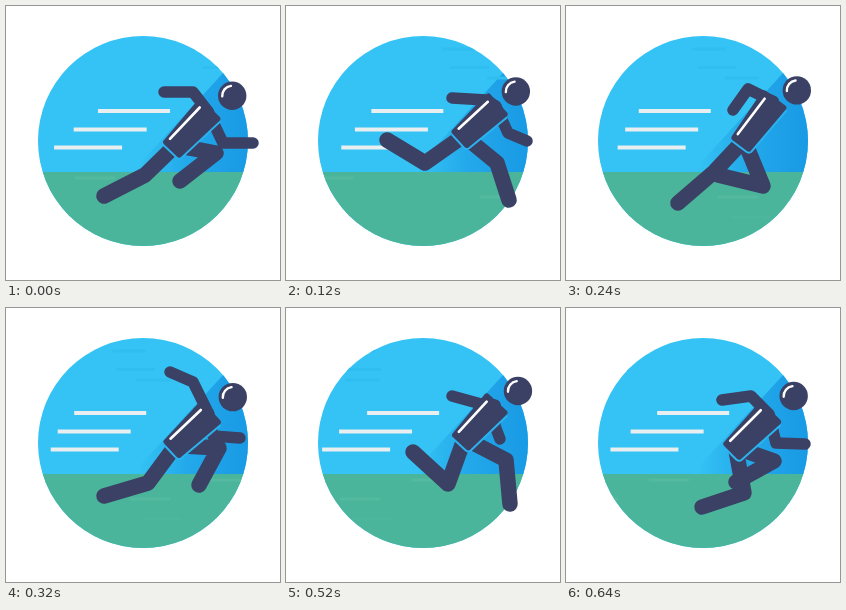
These frames come from a looping animation (274 by 274 pixels, 0.68 s). An HTML page with a canvas:

```html
<!DOCTYPE html>
<html lang="en">
<head>
<meta charset="utf-8">
<title>Runner</title>
<style>
html, body { margin: 0; width: 100%; height: 100%; overflow: hidden; background: #fff; }
canvas { display: block; width: 100vw; height: 100vh; }
</style>
</head>
<body>
<canvas id="stage"></canvas>
<script>
const SIZE = 274, LOOP = 680, STEP = 40, TAU = Math.PI * 2;
const SKY = '#34c3f4', GRASS = '#4ab59a', BODY = '#3b4165', GAP = '#2bb3f0', LINE = '#e9eef0';
const canvas = document.getElementById('stage');
const ctx = canvas.getContext('2d');

// Key poses of one stride: x, y of each joint at the times in KEYS.
const KEYS = [0, 120, 240, 320, 440, 520, 640];
const JOINTS = {
  hip:      [166,143, 174,133, 175,138, 166,141, 173,133, 175,134, 166,143],
  chest:    [204,103, 212,98,  209,93,  205,104, 213,99,  211,95,  205,104],
  kneeA:    [139,169, 139,157, 197,180, 213,140, 218,143, 220,152, 178,185],
  footA:    [98,190,  101,134, 152,169, 193,177, 241,180, 224,196, 136,199],
  kneeB:    [210,147, 211,157, 148,166, 142,175, 138,158, 162,176, 208,153],
  footB:    [174,175, 223,194, 112,197, 98,188,  101,135, 127,144, 170,174],
  elbowA:   [187,86,  200,94,  201,112, 207,128, 222,121, 209,118, 185,88],
  handA:    [158,86,  166,92,  200,118, 234,130, 242,130, 214,131, 156,92],
  elbowB:   [217,137, 222,127, 182,83,  187,74,  198,84,  195,96,  210,135],
  handB:    [247,137, 241,135, 167,104, 164,64,  173,64,  166,88,  239,136]
};
// Rear speed lines: y, middle x, swing, phase in degrees, length.
const LINES = [[105, 80, 12, 0, 72], [123.5, 59, 11, 38, 73], [141.5, 45.5, 10, 75, 68]];
// Faint streaks: y, start x, speed in px per ms, length, colour.
const STREAKS = [
  [43, 188, .25, 30, '#30bdef'], [61.5, 198, .27, 36, '#30bdef'], [72, 245, .355, 32, '#30bdef'],
  [172, 70, .35, 38, '#53baa0'], [191, 237, .35, 38, '#53baa0'], [211, 250, .35, 36, '#4db79d']
];

// Periodic cubic through uneven keys.
function sample(track, axis, t) {
  const n = KEYS.length;
  const time = i => KEYS[(i + n) % n] + Math.floor(i / n) * LOOP;
  const value = i => track[((i + n) % n) * 2 + axis];
  const slope = i => (value(i + 1) - value(i - 1)) / (time(i + 1) - time(i - 1));
  let i = n - 1;
  while (KEYS[i] > t) i--;
  const d = time(i + 1) - time(i), u = (t - time(i)) / d, v = 1 - u;
  return value(i) * v * v * (1 + 2 * u) + value(i + 1) * u * u * (3 - 2 * u)
    + d * u * v * (slope(i) * v - slope(i + 1) * u);
}

function stroke(points, width, color, cap = 'round') {
  ctx.beginPath();
  points.forEach(p => ctx.lineTo(p[0], p[1]));
  ctx.lineWidth = width;
  ctx.strokeStyle = color;
  ctx.lineCap = cap;
  ctx.lineJoin = 'round';
  ctx.stroke();
}

function backdrop(t) {
  ctx.save();
  ctx.beginPath();
  ctx.arc(137, 135, 105, 0, TAU);
  ctx.clip();
  ctx.fillStyle = SKY;
  ctx.fillRect(0, 0, SIZE, SIZE);
  const shade = ctx.createLinearGradient(132, 0, 240, 0);
  shade.addColorStop(0, 'rgba(24,152,228,0)');
  shade.addColorStop(.45, 'rgba(24,152,228,.6)');
  shade.addColorStop(1, 'rgba(24,152,228,.95)');
  ctx.fillStyle = shade;
  ctx.beginPath();
  [[218, 66], [126, 166], [250, 166], [250, 66]].forEach(p => ctx.lineTo(p[0], p[1]));
  ctx.fill();
  ctx.fillStyle = GRASS;
  ctx.fillRect(0, 166, SIZE, 110);
  for (const [y, start, speed, length, color] of STREAKS) {
    let x = start - speed * t;
    if (x < -length) x += speed * LOOP;
    stroke([[x, y], [x + length, y]], 3, color);
  }
  ctx.restore();
}

function runner(t) {
  const pose = {};
  for (const name in JOINTS) pose[name] = [0, 1].map(axis => sample(JOINTS[name], axis, t));
  const { hip, chest } = pose;
  const dx = chest[0] - hip[0], dy = chest[1] - hip[1], len = Math.hypot(dx, dy);
  const ux = dx / len, uy = dy / len;
  // Offset from a joint along the spine and to its left side.
  const at = (p, along, left) => [p[0] + ux * along + uy * left, p[1] + uy * along - ux * left];
  const root = at(hip, 5, 0), shoulder = at(chest, -3, 0);

  for (const s of ['A', 'B']) {
    stroke([root, pose['knee' + s], pose['foot' + s]], 15.5, BODY);
    stroke([shoulder, pose['elbow' + s], pose['hand' + s]], 11.5, BODY);
  }

  const torso = [at(hip, 1, 9), at(hip, 1, -9), at(chest, -2, -12), at(chest, -2, 12)];
  stroke(torso.slice(0, 3), 10, GAP, 'butt');
  stroke([...torso, torso[0], torso[1]], 6, BODY);
  ctx.fillStyle = BODY;
  ctx.fill();
  stroke([at(hip, 6, 8.5), at(chest, -6, 8.5)], 2.6, '#fff');

  const bob = -Math.cos(TAU * (t - 20) / (LOOP / 2));
  const hx = 229 + 3 * bob, hy = 86.5 - 3.5 * bob;
  ctx.beginPath();
  ctx.arc(hx, hy, 14.2, 0, TAU);
  ctx.fill();
  ctx.beginPath();
  ctx.arc(hx, hy, 10, Math.PI * .98, Math.PI * 1.46);
  ctx.lineWidth = 2.4;
  ctx.strokeStyle = '#fff';
  ctx.stroke();
}

function draw(now) {
  const t = Math.floor((now % LOOP) / STEP) * STEP;
  const w = Math.round(innerWidth * devicePixelRatio), h = Math.round(innerHeight * devicePixelRatio);
  if (canvas.width !== w || canvas.height !== h) { canvas.width = w; canvas.height = h; }
  ctx.setTransform(w / SIZE, 0, 0, h / SIZE, 0, 0);
  ctx.fillStyle = '#fff';
  ctx.fillRect(0, 0, SIZE, SIZE);
  backdrop(t);
  for (const [y, mid, swing, phase, length] of LINES) {
    const x = mid + swing * Math.cos(TAU * (t / LOOP - phase / 360));
    stroke([[x, y], [x + length, y]], 4, LINE, 'butt');
  }
  runner(t);
}

let begin;
function tick(now) {
  begin ??= now;
  draw(Math.max(0, now - begin));
  requestAnimationFrame(tick);
}
draw(0);
requestAnimationFrame(tick);
</script>
</body>
</html>
```
